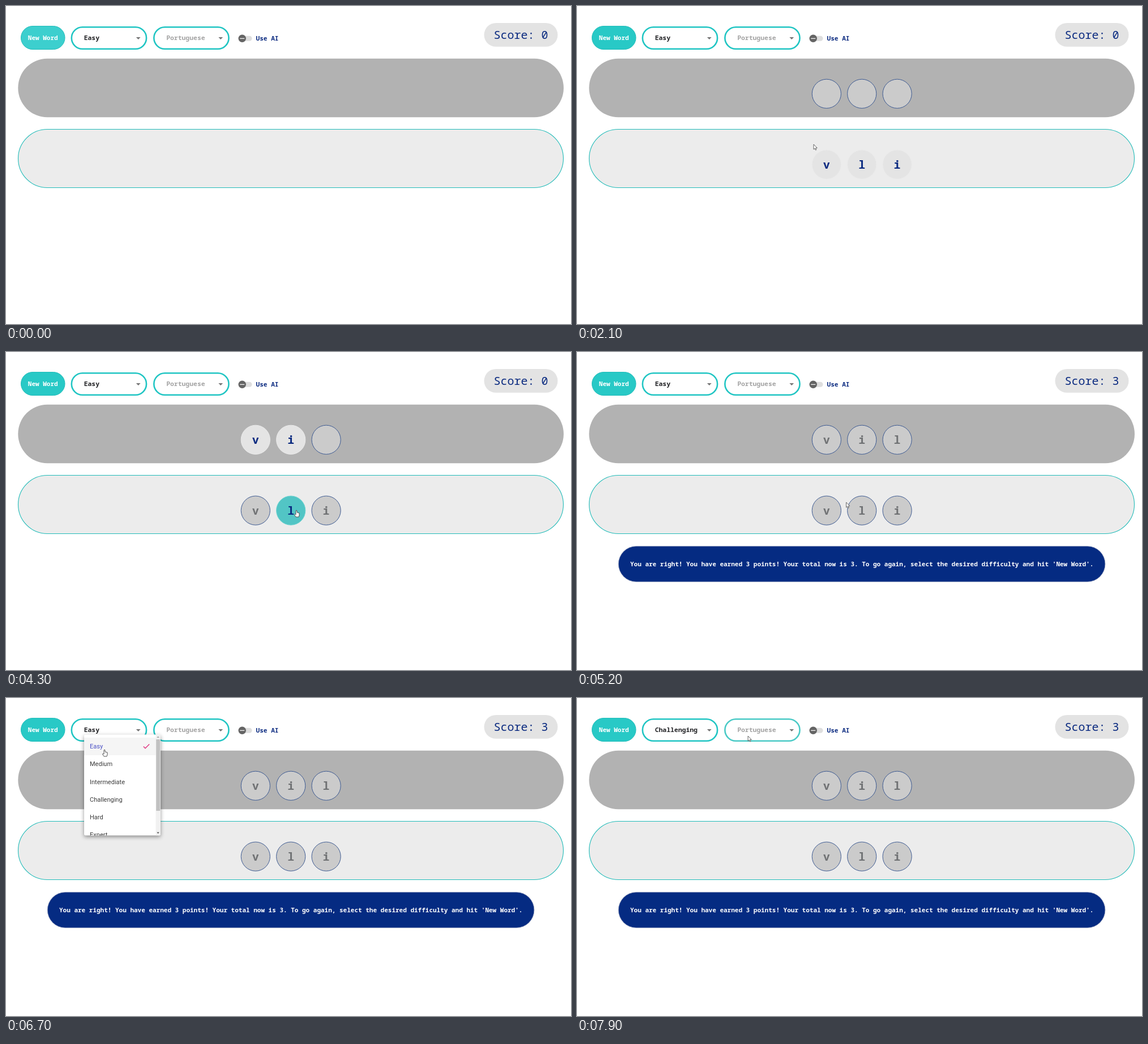
These frames come from a looping animation (998 by 561 pixels, 8 s). An HTML page with a canvas:

```html
<!DOCTYPE html>
<html lang="en">
<head>
<meta charset="utf-8">
<title>Word game</title>
<style>
html, body { margin: 0; width: 100%; height: 100%; overflow: hidden; background: #fff; }
canvas { display: block; width: 100%; height: 100%; }
</style>
</head>
<body>
<canvas id="stage" width="998" height="561"></canvas>
<script>
const ctx = document.getElementById('stage').getContext('2d');
const LOOP = 8000;
const STEP = 100;
const NAVY = '#0a2a80';
const TEAL = '#20c5c3';
const MONO = '"Noto Sans Mono", "DejaVu Sans Mono", monospace';
const SANS = 'Roboto, sans-serif';
const ROW_TOP = 154.8, ROW_BOTTOM = 279.6, RADIUS = 26;
const LEVELS = ['Easy', 'Medium', 'Intermediate', 'Challenging', 'Hard', 'Expert'];
const MESSAGE = "You are right! You have earned 3 points! Your total now is 3. " +
  "To go again, select the desired difficulty and hit 'New Word'.";

const TILES_AT = 500, SOLVED_AT = 4400, LOCKED_AT = 4600;
const MENU_OPEN = 6100, MENU_CLOSE = 7500;

// Letters in scrambled order, with the slot each one goes to and when
const LETTERS = [
  { char: 'v', slot: 0, at: 3500 },
  { char: 'l', slot: 2, at: SOLVED_AT },
  { char: 'i', slot: 1, at: 3900 }
];

const LOOKS = {
  empty: { fill: '#cbcbcb', border: '#3d5a92', ink: NAVY },
  ready: { fill: '#e4e4e4', border: '#ebebeb', ink: NAVY },
  hover: { fill: '#52c5c5', border: '#6bd3d0', ink: NAVY },
  fading: { fill: '#c2c2c2', border: '#cacaca', ink: NAVY },
  used: { fill: '#cbcbcb', border: '#3d5a92', ink: '#707274' }
};

// Eased pointer moves, each from where the last one ended
const HOME = { x: 77, y: 67 };
const MOVES = [
  { from: 1500, to: 1600, x: 143, y: 91 },
  { from: 1800, to: 2100, x: 418, y: 244 },
  { from: 2700, to: 3000, x: 432, y: 240 },
  { from: 3100, to: 3400, x: 446, y: 272 },
  { from: 3400, to: 3700, x: 562, y: 280 },
  { from: 3900, to: 4200, x: 513, y: 279 },
  { from: 4500, to: 4700, x: 502, y: 274 },
  { from: 5100, to: 5400, x: 400, y: 240 },
  { from: 5400, to: 6000, x: 177, y: 62 },
  { from: 6200, to: 6500, x: 174, y: 91 },
  { from: 6700, to: 7200, x: 207, y: 178 },
  { from: 7500, to: 7900, x: 302, y: 67 }
];

const within = (t, from, to) => t >= from && t < to;
const menuOpen = t => within(t, MENU_OPEN, MENU_CLOSE);
const columnX = n => 440.8 + 62.4 * n;
const ease = k => k * k * (3 - 2 * k);

function pointerAt(t) {
  let { x, y } = HOME;
  for (const move of MOVES) {
    if (t <= move.from) break;
    const k = ease(Math.min(1, (t - move.from) / (move.to - move.from)));
    x += (move.x - x) * k;
    y += (move.y - y) * k;
  }
  return { x, y };
}

const inBox = (p, x, y, w, h) => within(p.x, x, x + w) && within(p.y, y, y + h);
const overTile = (p, n) => Math.hypot(p.x - columnX(n), p.y - ROW_BOTTOM) < RADIUS;

function box(x, y, w, h, r, fill) {
  ctx.beginPath();
  ctx.roundRect(x, y, w, h, r);
  ctx.fillStyle = fill;
  ctx.fill();
}

function outline(color, line) {
  ctx.strokeStyle = color;
  ctx.lineWidth = line;
  ctx.stroke();
}

function pill(x, y, w, h, fill, stroke, line = 1) {
  box(x, y, w, h, h / 2, fill);
  if (stroke) outline(stroke, line);
}

function disc(x, y, r, fill) {
  ctx.beginPath();
  ctx.arc(x, y, r, 0, Math.PI * 2);
  ctx.fillStyle = fill;
  ctx.fill();
}

// Triangle with a flat side centred on x, y; a negative height points up
function caret(x, y, w, h, fill) {
  ctx.beginPath();
  ctx.moveTo(x - w / 2, y);
  ctx.lineTo(x + w / 2, y);
  ctx.lineTo(x, y + h);
  ctx.fillStyle = fill;
  ctx.fill();
}

function text(str, x, y, size, color, align = 'left', font = MONO, weight = 600) {
  ctx.font = `${weight} ${size}px ${font}`;
  ctx.textAlign = align;
  ctx.fillStyle = color;
  ctx.fillText(str, x, y);
}

function tile(column, y, look, letter = '') {
  const { fill, border, ink } = LOOKS[look];
  const x = columnX(column);
  disc(x, y, RADIUS - 0.4, fill);
  outline(border, 1);
  text(letter, x, y + 7.6, 20, ink, 'center');
}

function newWordButton(t, pointer) {
  const x = 26.5, y = 35.5, w = 77.5, h = 41;
  const hovered = inBox(pointer, x, y, w, h);
  pill(x, y, w, h, hovered ? '#3ccfce' : '#28c9c6', '#20bcb9');
  if (within(t, 300, 900)) {
    const k = (t - 200) / 700;
    ctx.save();
    ctx.clip();
    ctx.globalAlpha = 0.25 * (1 - k);
    disc(HOME.x, HOME.y, 20 + 70 * k, '#fff');
    ctx.restore();
  }
  text('New Word', x + w / 2, 60, 11, '#fff', 'center');
}

function select(x, label, ink, pointer) {
  const hovered = inBox(pointer, x, 36, 135, 41);
  pill(x + 1.3, 37.3, 132.2, 38.4, '#fff', hovered ? '#4acac6' : TEAL, 2.6);
  text(label, x + 23.2, 60.3, 11.4, ink);
  caret(x + 119.2, 55, 7.8, 4, '#757575');
}

function toolbar(t, pointer) {
  newWordButton(t, pointer);
  select(114.5, t >= MENU_CLOSE ? 'Challenging' : 'Easy', '#202124', pointer);
  select(260, 'Portuguese', '#a3a3a3', pointer);
  pill(412, 52.8, 22.5, 9, '#dedede');
  disc(417.2, 57.3, 6.7, '#646464');
  box(413.2, 56.7, 8, 1.2, 0, '#fff');
  text('Use AI', 441.5, 61, 11.1, NAVY);
  pill(844.5, 30, 130, 41.8, '#e3e3e3');
  text('Score: ' + (t >= SOLVED_AT ? 3 : 0), 909.5, 57.5, 20, NAVY, 'center', MONO, 500);
}

function tiles(t, pointer) {
  LETTERS.forEach(({ char, slot, at }, n) => {
    const placed = t >= at;
    const locked = t >= LOCKED_AT || at === SOLVED_AT;
    if (placed) tile(slot, ROW_TOP, locked ? 'used' : 'ready', char);
    else tile(slot, ROW_TOP, 'empty');

    const passed = overTile(pointerAt(t - STEP), n) || char === 'l' && within(t, 3500, 3700);
    const look = placed ? 'used' : overTile(pointer, n) ? 'hover' : passed ? 'fading' : 'ready';
    tile(n, ROW_BOTTOM, look, char);
  });
}

function menu(pointer) {
  const x = 138, y = 64.5, w = 135, h = 178, row = 31.2, first = 69.8;
  ctx.save();
  ctx.shadowColor = 'rgba(0,0,0,0.42)';
  ctx.shadowBlur = 7;
  ctx.shadowOffsetY = 2.5;
  box(x, y, w, h, 2.5, '#fff');
  ctx.restore();

  ctx.save();
  ctx.clip();
  const over = Math.floor((pointer.y - first) / row);
  LEVELS.forEach((name, n) => {
    const top = first + n * row;
    if (n === 0 || n === over) box(x, top, w, row, 0, '#f5f5f5');
    text(name, x + 10, top + 19.3, 11, n ? '#3c3c3c' : '#4a4fc4', 'left', SANS, 400);
  });
  ctx.beginPath();
  ctx.moveTo(242.8, 85.5);
  ctx.lineTo(246, 88.7);
  ctx.lineTo(253.2, 81.5);
  outline('#e0357f', 1.4);

  box(264.6, y, 9, h, 0, '#f1f1f1');
  box(265.2, 73, 7, 126, 0, '#c1c1c1');
  caret(268.6, 70, 4.4, -2.4, '#a3a3a3');
  caret(268.6, 236.8, 4.4, 2.4, '#505050');
  ctx.restore();
}

function arrow() {
  const shape = new Path2D('M0 0V9L2 7.2L3.4 10.2L4.8 9.6L3.5 6.7L6.2 6.4Z');
  ctx.fillStyle = '#fff';
  ctx.fill(shape);
  ctx.strokeStyle = '#555';
  ctx.lineWidth = 0.9;
  ctx.stroke(shape);
}

function hand() {
  const shape = new Path2D('M-1 8V1Q0-1 1 1V4L5 5V9L4 12H-1L-3.6 8Q-3 6-1 8Z');
  ctx.fillStyle = '#fff';
  ctx.fill(shape);
  ctx.strokeStyle = '#444';
  ctx.lineWidth = 0.9;
  ctx.stroke(shape);
}

function drawPointer(t, pointer) {
  const onLetter = LETTERS.some(({ at }, n) => t <= at && overTile(pointer, n));
  const onControl = inBox(pointer, 26, 36, 223, 41);
  ctx.save();
  ctx.translate(pointer.x, pointer.y);
  ctx.lineJoin = 'round';
  if (onLetter || onControl || menuOpen(t)) hand();
  else arrow();
  ctx.restore();
}

function draw(t) {
  const pointer = pointerAt(t);
  box(0, 0, 998, 561, 0, '#fff');
  toolbar(t, pointer);
  pill(21.3, 92.7, 963.7, 103.6, '#b2b2b2');
  pill(21.5, 217.5, 963, 103, '#ececec', '#20bbb8', 1.1);
  if (t >= TILES_AT) tiles(t, pointer);
  if (t >= SOLVED_AT) {
    pill(73.3, 342.7, 859.6, 62.6, '#052b82', '#8490b4', 0.8);
    text(MESSAGE, 503.2, 377.6, 11, '#fff', 'center');
  }
  if (menuOpen(t)) menu(pointer);
  if (t >= 300) drawPointer(t, pointer);
}

const start = performance.now();
function frame() {
  const t = (performance.now() - start) % LOOP;
  draw(Math.floor(t / STEP) * STEP);
  requestAnimationFrame(frame);
}
frame();
</script>
</body>
</html>
```
